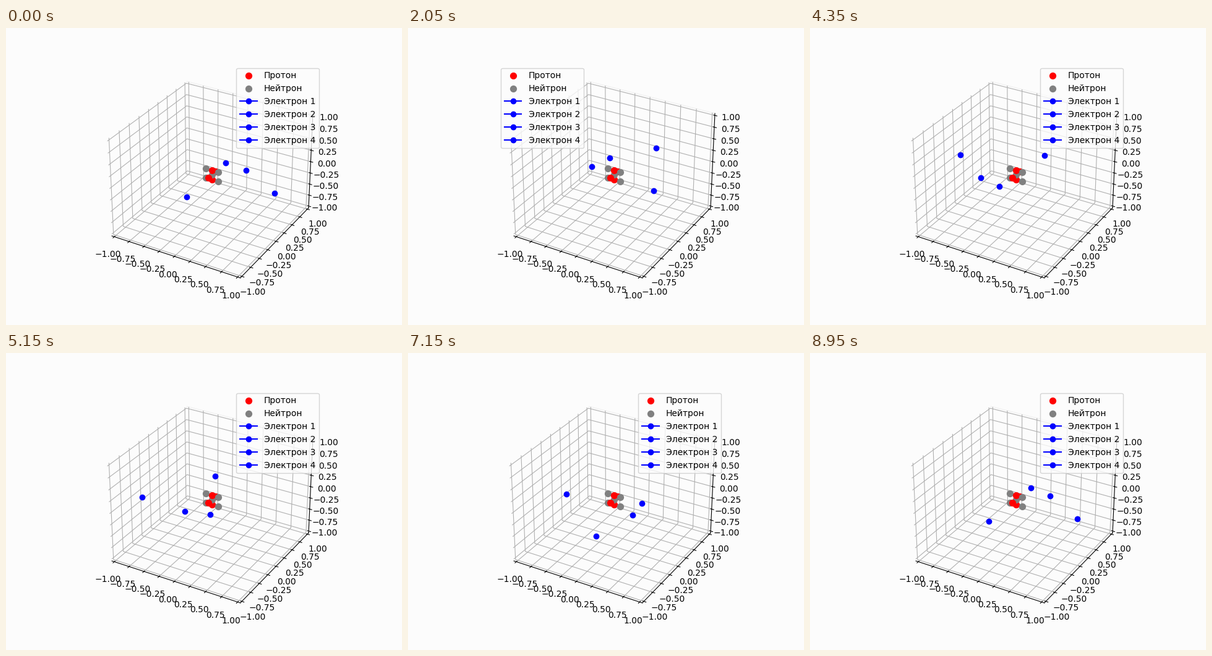
Write a matplotlib script that moves like this. It is 640 by 480 pixels and loops after 9000 ms.

```python
import numpy as np
import matplotlib.pyplot as plt
from matplotlib.animation import FuncAnimation

FRAMES = 180
BG = "#fcfcfc"
GAP = 0.1    # spacing inside the nucleus

# (radius, start angle in degrees) of each circular orbit
ORBITS = [(1.0, 0), (0.5, 45), (0.4, 90), (0.7, -90)]

PROTONS = [(0, 0, 1), (0, 0, -1), (0, 1, 0), (0, -1, 0)]
NEUTRONS = [(0, 0, 0), (1, 0, 1), (1, 0, -1), (-1, 0, 1), (-1, 0, -1)]

plt.rcParams.update({"font.family": "DejaVu Sans",
                     "figure.facecolor": BG, "axes.facecolor": BG})
fig = plt.figure(figsize=(6.4, 4.8), dpi=100)
ax = fig.add_subplot(projection="3d")


def add_nucleons(cells, color, label):
    for i, cell in enumerate(cells):
        x, y, z = GAP * np.array(cell)
        ax.scatter([x], [y], [z], c=color, s=50, depthshade=False,
                   label=label if i == 0 else None)


def electron_pos(orbit, frame):
    radius, start = orbit
    angle = np.radians(start + 360 * frame / FRAMES)
    return [radius * np.cos(angle)], [radius * np.sin(angle)], [0]


add_nucleons(PROTONS, "red", "Протон")
add_nucleons(NEUTRONS, "gray", "Нейтрон")
electrons = [ax.plot(*electron_pos(orbit, 0), "bo-", label=f"Электрон {n}")[0]
             for n, orbit in enumerate(ORBITS, 1)]

# Slight margin around the -1..1 cube
lim = 25 / 24
ticks = np.linspace(-1, 1, 9)
ax.set(xlim=(-lim, lim), ylim=(-lim, lim), zlim=(-lim, lim),
       xticks=ticks, yticks=ticks, zticks=ticks)
for axis in (ax.xaxis, ax.yaxis, ax.zaxis):
    axis.set_pane_color(BG)
ax.yaxis.pane.set_edgecolor("0.95")

# "best" lets the legend hop aside while an electron passes beneath it
ax.legend(loc="best")


def update(frame):
    for line, orbit in zip(electrons, ORBITS):
        line.set_data_3d(*electron_pos(orbit, frame))
    return electrons


anim = FuncAnimation(fig, update, frames=FRAMES, interval=50,
                     repeat=True, repeat_delay=0, blit=False)
plt.show()
```
